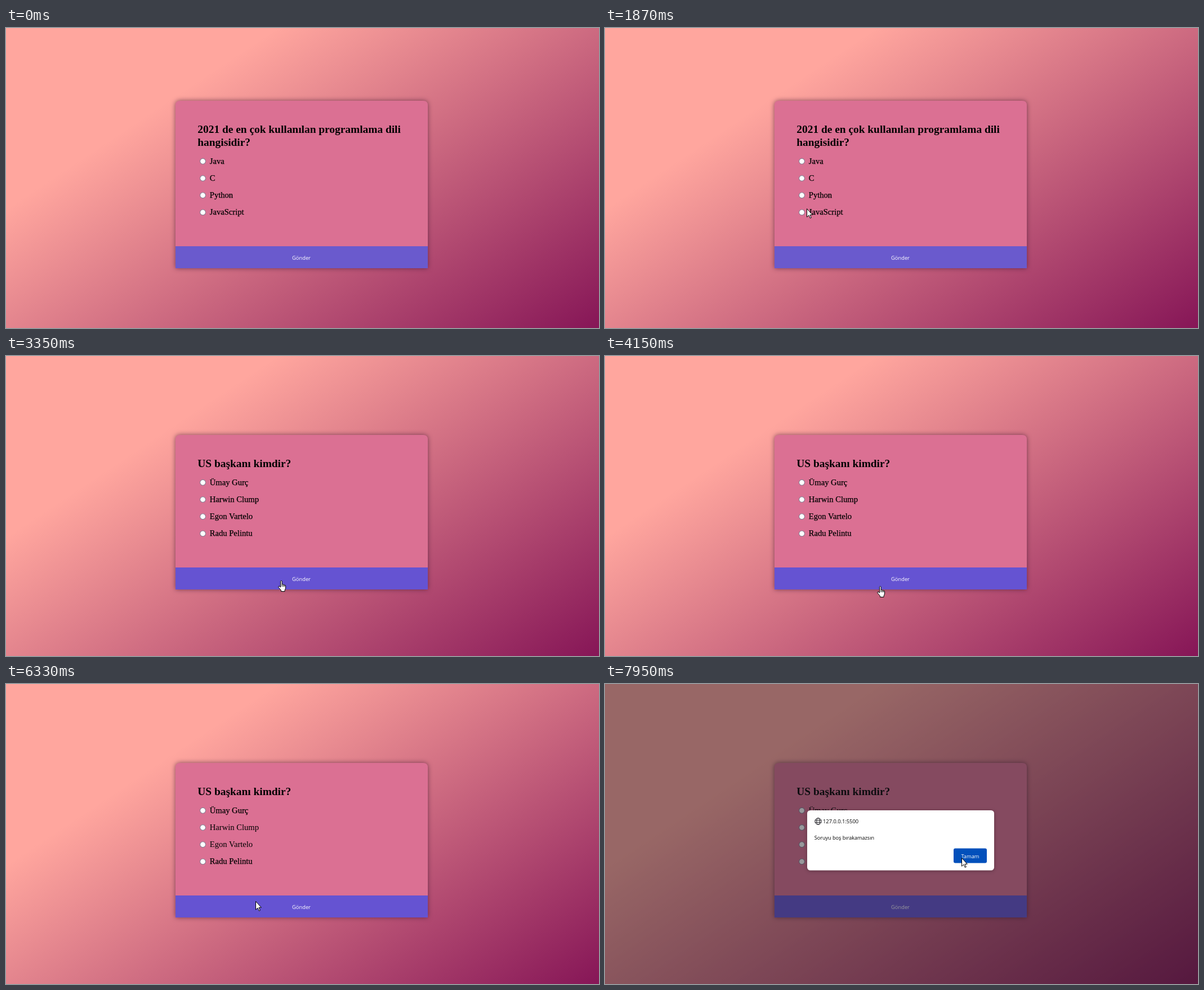
An HTML page that plays this animation: 1053x532 px, repeating every 8000 ms.

```html
<!DOCTYPE html>
<html lang="tr">
<head>
<meta charset="utf-8">
<title>Quiz</title>
<style>
  html, body { margin: 0; width: 100%; height: 100%; overflow: hidden; }
  body { background: linear-gradient(146.3deg, #ffa69e 26%, #861657); }
  svg { display: block; width: 1053px; height: 532px; }
  .serif { font-family: "Liberation Serif", "Times New Roman", serif; }
  .title { font-size: 19.4px; font-weight: bold; }
  .option { font-size: 14.6px; stroke: #000; stroke-width: .25px; }
  .light { stroke: none; }
  .ui { font-family: "Open Sans", "Noto Sans", sans-serif; font-size: 9.3px; }
  .mid { text-anchor: middle; fill: #fff; }
  .card { fill: #db7093; filter: drop-shadow(0 0 4px rgba(75, 30, 55, .7)); }
  .radio { fill: #fff; stroke: #887c92; stroke-width: 1.1px; }
  .dialog { fill: #fff; filter: drop-shadow(0 1px 3px rgba(0, 0, 0, .3)); }
  .line { fill: none; stroke: #15141a; }
  .cursor path { fill: #fff; stroke: #000; stroke-linejoin: round; }
</style>
</head>
<body>
<svg viewBox="0 0 1053 532">
  <g id="page"></g>
  <g id="alert">
    <rect width="1053" height="532" fill="rgba(28,27,34,.45)"/>
    <rect class="dialog" x="359" y="224" width="332" height="106.5" rx="5.5"/>
    <g class="line" transform="translate(378.5 243.5)">
      <circle r="5.7"/>
      <ellipse rx="2.7" ry="5.7"/>
      <path d="M-5.5-1.8H5.5M-5.5 1.8H5.5" stroke-width=".9"/>
    </g>
    <text class="ui" x="387" y="247.3">127.0.0.1:5500</text>
    <text class="ui" x="371.7" y="276" style="font-size:9.1px">Soruyu boş bırakamazsın</text>
    <rect id="ok" x="619" y="291.5" width="59" height="26" rx="3"/>
    <text class="ui mid" x="648.5" y="308.5">Tamam</text>
  </g>
  <g id="arrow" class="cursor">
    <path d="M.5.5V15.2L3.9 12.1L6.3 17.3L8.3 16.4L6 11.3H10.3Z"/>
  </g>
  <g id="hand" class="cursor">
    <path d="M4.5 12V1.7Q4.5.5 5.7.5T7 1.7V7Q9.2 6 9.4 7.6Q11.3 6.8 11.6 8.4Q13.5 8 13.5 10V14L12 17.5V19.5H5.5V17.5L1 12.3Q.2 10.5 1.8 10.2Q3.2 10.4 4.5 12Z"/>
    <path d="M7 7V11M9.4 7.6V11M11.6 8.4V11"/>
  </g>
</svg>
<script>
const LOOP = 8000, STEP = 70;
const CHECK = 2260, SWITCH = 3350, REPAINT = 4490, RELEASE = 6260, ALERT = 6400;
const MIDDLE = 277.5, LINE = 23, ROW = 30.2, BUTTON = 39;
const $ = id => document.getElementById(id);

const quizzes = [
  { title: ["2021 de en çok kullanılan programlama dili", "hangisidir?"],
    options: ["Java", "C", "Python", "JavaScript"] },
  { title: ["US başkanı kimdir?"],
    options: ["Ümay Gurç", "Harwin Clump", "Egon Vartelo", "Radu Pelintu"] }
];

// Each move starts where the last one ended and curves towards its bend.
const entry = [1050, 530];
const moves = [
  { start: 480, end: 1530, to: [395, 311], bend: [1002, 254] },
  { start: 1660, end: 1930, to: [348, 323] },
  { start: 2190, end: 2890, to: [488, 398], bend: [420, 315] },
  { start: 4080, end: 4840, to: [325, 184], bend: [498, 469] },
  { start: 4840, end: 5670, to: [443, 385], bend: [265, 235] },
  { start: 6860, end: 7680, to: [623, 308], bend: [480, 290] },
  { start: 7680, end: 7950, to: [633, 308] }
];
moves.forEach((m, i) => {
  m.from = i ? moves[i - 1].to : entry;
  m.bend ??= m.from.map((v, axis) => (v + m.to[axis]) / 2);
});

function pointerAt(t) {
  const m = moves.findLast(m => m.start <= t);
  if (!m) return null;
  const snapped = Math.floor((t - m.start) / STEP) * STEP;
  const k = t >= m.end ? 1 : snapped / (m.end - m.start);
  const [x, y] = m.from.map((v, axis) => Math.round(
    (1 - k) ** 2 * v + 2 * k * (1 - k) * m.bend[axis] + k * k * m.to[axis]));
  return { x, y };
}

// The card is centred and grows with the number of title lines.
for (const q of quizzes) {
  const height = 251 + LINE * q.title.length;
  q.top = Math.floor(MIDDLE - height / 2);
  q.bottom = q.top + height;
  q.button = q.bottom - BUTTON;
}

function quizMarkup({ title, options, top, bottom, button }) {
  const titles = title.map((s, i) =>
    `<text class="serif title" x="340.3" y="${top + 57 + i * LINE}">${s}</text>`);
  const rows = options.map((s, i) => {
    const y = bottom - 189.7 + i * ROW;
    return `<circle class="radio" cx="349.5" cy="${y}" r="4.9"/>
      <text class="serif option" x="361.8" y="${y + 4.5}">${s}</text>`;
  });
  return `<g>
    <path class="card" d="M301 ${bottom}V${top + 8}q0-8 8-8H741q8 0 8 8V${bottom}Z"/>
    <rect class="send" x="301" y="${button}" width="448" height="${BUTTON}"/>
    <text class="ui mid" x="524.5" y="${button + 23.5}">Gönder</text>
    ${titles.join("")}${rows.join("")}</g>`;
}

$("page").innerHTML = quizzes.map(quizMarkup).join("");
const cards = [...$("page").children];
const sends = cards.map(c => c.querySelector(".send"));
const lastRadio = cards[0].querySelectorAll(".radio")[3];
const checkedY = lastRadio.getAttribute("cy");
lastRadio.insertAdjacentHTML("afterend",
  `<g id="checked"><circle cx="349.5" cy="${checkedY}" r="4.6" fill="#fff" stroke="#0060df" stroke-width="2"/>
   <circle cx="349.5" cy="${checkedY}" r="2.4" fill="#0060df"/></g>`);
const names = [...cards[1].querySelectorAll(".option")];

const show = (el, on) => el.style.display = on ? "" : "none";
const inside = (p, x0, y0, x1, y1) => p && p.x >= x0 && p.x <= x1 && p.y >= y0 && p.y <= y1;

function render(t) {
  const p = pointerAt(t), n = t < SWITCH ? 0 : 1, q = quizzes[n];
  const modal = t >= ALERT;
  const hover = inside(p, 301, q.button, 749, q.bottom);
  const hand = hover && t < RELEASE;
  cards.forEach((c, i) => show(c, i === n));
  sends[n].setAttribute("fill", hover || modal ? "#6553d2" : "#6a5acd");
  show($("checked"), t >= CHECK);
  names.forEach((el, i) =>
    el.classList.toggle("light", modal || (t >= REPAINT && (i === 1 || i === 2))));
  show($("alert"), modal);
  $("ok").setAttribute("fill", inside(p, 619, 291, 678, 318) ? "#0250bb" : "#0061e0");
  show($("arrow"), p && !hand);
  show($("hand"), hand);
  if (p) {
    $("arrow").setAttribute("transform", `translate(${p.x} ${p.y})`);
    $("hand").setAttribute("transform", `translate(${p.x - 5} ${p.y})`);
  }
}

const began = performance.now();
function tick() {
  render((performance.now() - began) % LOOP);
  requestAnimationFrame(tick);
}
tick();
</script>
</body>
</html>
```
